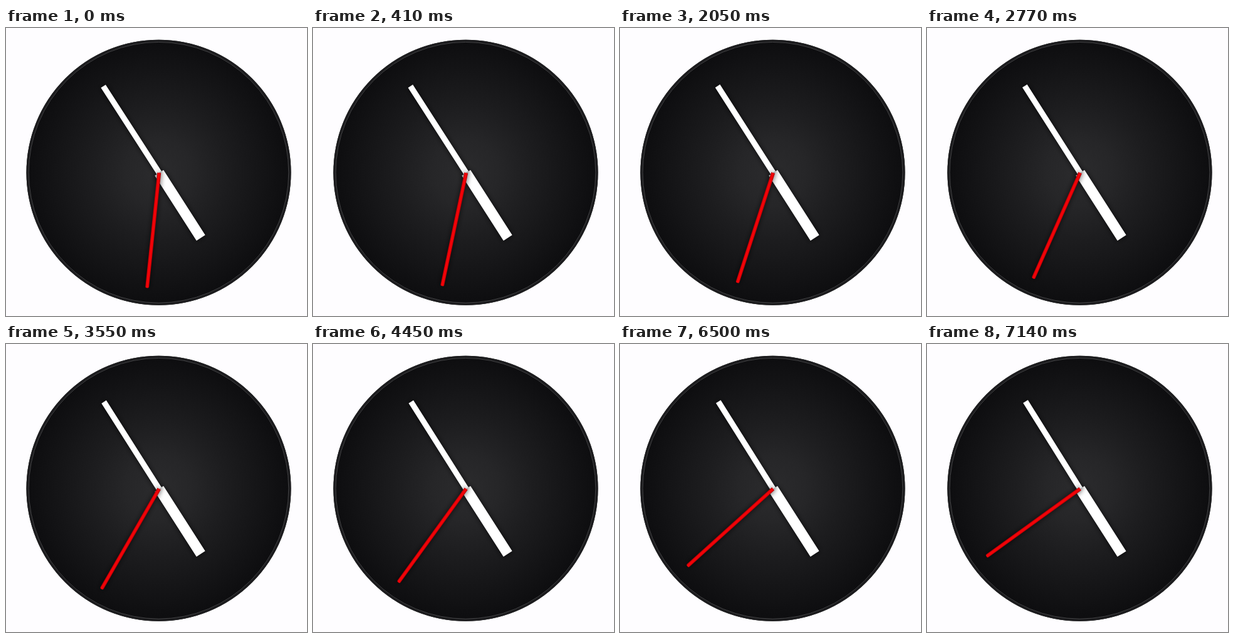
Write an HTML page with a canvas that moves like this. It is 480 by 458 pixels and loops after 7.19 s.

```html
<!DOCTYPE html>
<html lang="en">
<head>
<meta charset="utf-8">
<title>Clock</title>
<style>
  html, body { margin: 0; width: 100%; height: 100%; overflow: hidden; background: #fefdff; }
  canvas { display: block; }
</style>
</head>
<body>
<canvas id="clock" width="480" height="458"></canvas>
<script>
const ctx = document.getElementById('clock').getContext('2d');
const LOOP = 7190, FPS = 22, TICK = 200;
const CX = 243.5, CY = 229.8;
const START = 4 * 3600 + 54 * 60 + 31;
const TICKS = [36, 1035, 2045, 3037, 4037, 5037, 6037, 7031];

const face = ctx.createRadialGradient(CX, CY, 0, CX, CY, 211);
[[0, '#2b2b2d'], [0.25, '#262628'], [0.5, '#1d1d1f'], [0.75, '#151517'], [1, '#0d0d0f']]
  .forEach(([at, color]) => face.addColorStop(at, color));

const red = ctx.createLinearGradient(-3, 0, 3, 0);
[[0, '#a90004'], [0.3, '#f20308'], [0.7, '#f20308'], [1, '#a90004']]
  .forEach(([at, color]) => red.addColorStop(at, color));

const bezier = (a, b, u) =>
  3 * a * u * (1 - u) ** 2 + 3 * b * u * u * (1 - u) + u ** 3;

// Springy step: runs past the mark, falls short, then settles.
function spring(p) {
  if (p <= 0) return 0;
  if (p >= 1) return 1;
  let lo = 0, hi = 1;
  for (let i = 0; i < 24; i++) {
    const mid = (lo + hi) / 2;
    if (bezier(0.4, 0.55, mid) < p) lo = mid; else hi = mid;
  }
  return bezier(2.08, 0.44, lo);
}

function ring(radius, width, color) {
  ctx.beginPath();
  ctx.arc(CX, CY, radius, 0, Math.PI * 2);
  ctx.lineWidth = width;
  ctx.strokeStyle = color;
  ctx.stroke();
}

function hand(degrees, width, length, fill, round = 0) {
  ctx.save();
  ctx.translate(CX + 0.7, CY + 0.5);
  ctx.rotate(degrees * Math.PI / 180);
  ctx.shadowColor = 'rgba(0, 0, 0, 0.75)';
  ctx.shadowBlur = 8;
  ctx.fillStyle = fill;
  ctx.beginPath();
  ctx.roundRect(-width / 2, -length, width, length, [round, round, 0, 0]);
  ctx.fill();
  ctx.restore();
}

function draw(ms) {
  const seconds = TICKS.reduce((sum, at) => sum + spring((ms - at) / TICK), START);

  ctx.fillStyle = '#fefdff';
  ctx.fillRect(0, 0, 480, 458);
  ctx.beginPath();
  ctx.arc(CX, CY, 211, 0, Math.PI * 2);
  ctx.fillStyle = face;
  ctx.fill();
  ring(209.5, 3, '#1d1d1f');
  ring(207.3, 1, '#454547');

  hand(seconds / 120, 16.5, 123, '#fff');
  hand(seconds / 10, 9, 164, '#fff');
  hand(seconds * 6, 6, 184, red, 2);
}

let origin;
function loop(now) {
  origin ??= now;
  const t = (now - origin) % LOOP;
  draw(Math.floor((t + 5) * FPS / 1000) * 1000 / FPS);
  requestAnimationFrame(loop);
}
draw(0);
requestAnimationFrame(loop);
</script>
</body>
</html>
```
